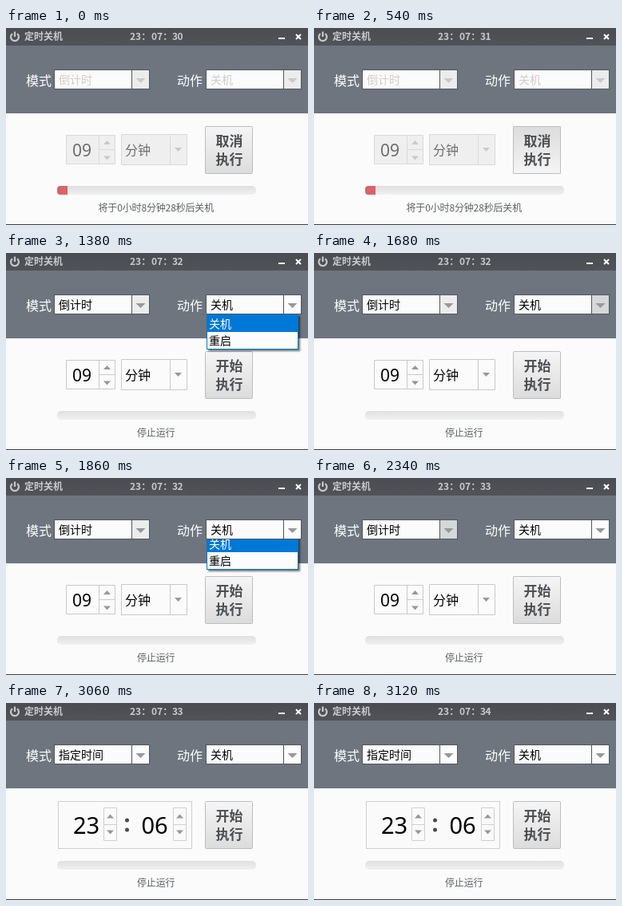
An HTML page for the animation above (3900 ms loop, 378 by 247 pixels).

```html
<!DOCTYPE html>
<html lang="zh-CN">
<head>
<meta charset="utf-8">
<title>定时关机</title>
<style>
html, body { margin: 0; width: 100%; height: 100%; overflow: hidden; background: #fbfbfb; }
#stage { display: block; width: 378px; height: 247px; font-family: "Noto Sans CJK SC", "Noto Sans CJK", sans-serif; }
#stage * { animation: 3.9s step-end infinite; }

.label { font-size: 16px; fill: #fff; }
.item { font-size: 14px; }
.note { font-size: 12px; fill: #5c5f68; letter-spacing: -.15px; }
.num { font-family: "Noto Sans", "Open Sans", sans-serif; font-size: 21px; }
.big { font-size: 29px; }
.bar { font-size: 12px; font-weight: 700; fill: #c9cacd; }
.go { font-size: 17px; font-weight: 700; fill: #4c4e51; text-anchor: middle; }
.field { fill: #fbfbfb; stroke: #51565d; }
.drop { stroke: #51565d; }
.spin { fill: #fafafa; stroke: #cfcfcf; }
.arrow { fill: #94999e; }
.list { fill: #fcfcfc; stroke: #0078d7; filter: drop-shadow(2.5px 2.5px 1px rgba(0, 0, 0, .55)); }
.pick { fill: #0078d7; }

/* disabled until the countdown is cancelled */
#stage .ink { animation-name: ink; }
#stage .dim { animation-name: dim; }
#stage .tri { animation-name: tri; }
#stage .box { animation-name: box; }
@keyframes ink { 0% { fill: #d3ccc9 } 15.384% { fill: #000 } }
@keyframes dim { 0% { fill: #6c6c6c } 15.384% { fill: #000 } }
@keyframes tri { 0% { fill: #c8cacc } 15.384% { fill: #94999e } }
@keyframes box { 0% { fill: #efefef; stroke: #d9d9d9 } 15.384% { fill: #fbfbfb; stroke: #c9c9c9 } }

#stage .running { animation-name: running; }
#stage .stopped { animation-name: stopped; }
@keyframes running { 0% { visibility: visible } 15.384% { visibility: hidden } }
@keyframes stopped { 0% { visibility: hidden } 15.384% { visibility: visible } }

#stage .countdown { animation-name: countdown; }
#stage .fixed { animation-name: fixed; }
@keyframes countdown { 0% { visibility: visible } 78.461% { visibility: hidden } }
@keyframes fixed { 0% { visibility: hidden } 78.461% { visibility: visible } }

#stage .hover { animation-name: hover; }
#stage .press { animation-name: press; }
@keyframes hover { 0% { visibility: hidden } 6.153% { visibility: visible } 18.461% { visibility: hidden } }
@keyframes press { 0% { visibility: hidden } 13.846% { visibility: visible } 15.384% { visibility: hidden } }

#stage .seconds { animation-name: seconds; }
@keyframes seconds {
  0% { transform: translateY(0) }
  6.153% { transform: translateY(-20px) }
  26.153% { transform: translateY(-40px) }
  53.846% { transform: translateY(-60px) }
  80% { transform: translateY(-80px) }
}

/* lists slide out from under their boxes and close at once */
#stage .act-list { animation-name: act-list; }
#stage .mode-list { animation-name: mode-list; }
@keyframes act-list {
  0%, 43.076%, 60% { transform: translateY(-60px) }
  30.769%, 44.615% { transform: translateY(-33px) }
  32.307%, 46.153% { transform: translateY(-20px) }
  33.846%, 47.692% { transform: translateY(-6px) }
  35.384%, 49.23% { transform: translateY(0) }
}
@keyframes mode-list {
  0%, 78.461% { transform: translateY(-60px) }
  63.076% { transform: translateY(-33px) }
  64.615% { transform: translateY(-20px) }
  66.153% { transform: translateY(-6px) }
  67.692% { transform: translateY(0) }
}
#stage .mode-pick { animation-name: mode-pick; }
#stage .first { animation-name: first; }
#stage .second { animation-name: second; }
@keyframes mode-pick { 0% { transform: translateY(21px) } 69.23% { transform: translateY(0) } }
@keyframes first { 0% { fill: #000 } 69.23% { fill: #fff } }
@keyframes second { 0% { fill: #fff } 69.23% { fill: #000 } }

#stage .act-drop { animation-name: act-drop; }
#stage .mode-drop { animation-name: mode-drop; }
@keyframes act-drop {
  0% { fill: #ececec }
  27.692%, 43.076% { fill: #d6d7d8 }
  30.769%, 44.615% { fill: #fcfcfc }
}
@keyframes mode-drop {
  0% { fill: #ececec }
  60% { fill: #d6d7d8 }
  63.076% { fill: #fcfcfc }
}
</style>
</head>
<body>
<svg id="stage" viewBox="0 0 378 247">
  <defs>
    <linearGradient id="top" x2="0" y2="1"><stop stop-color="#4a4c51"/><stop offset="1" stop-color="#515359"/></linearGradient>
    <linearGradient id="idle" x2="0" y2="1"><stop stop-color="#f5f5f5"/><stop offset="1" stop-color="#dcdcdc"/></linearGradient>
    <linearGradient id="lit" x2="0" y2="1"><stop stop-color="#fafafa"/><stop offset="1" stop-color="#e6e6e6"/></linearGradient>
    <linearGradient id="down" x2="0" y2="1"><stop stop-color="#dcdcdc"/><stop offset="1" stop-color="#f5f5f5"/></linearGradient>
    <linearGradient id="track" x2="0" y2="1"><stop stop-color="#e0e0e0"/><stop offset="1" stop-color="#f0f0f0"/></linearGradient>
    <path id="tri" d="M-6-3H6L0 3z"/>
    <path id="small" d="M-4.5-2.5H4.5L0 2.5z"/>
    <g id="steps">
      <path class="spin" d="M.5.5h16v41H.5zM.5 21.5h16"/>
      <use href="#small" class="arrow" transform="translate(8.5 11) scale(1 -1)"/>
      <use href="#small" class="arrow" x="8.5" y="31"/>
    </g>
  </defs>

  <rect width="378" height="247" fill="#fbfbfb"/>
  <rect width="378" height="22" fill="url(#top)"/>
  <rect y="22" width="378" height="85" fill="#6e757f"/>
  <rect y="246" width="378" height="1" fill="#3c3e43"/>

  <!-- title bar -->
  <path d="M8 7.2A5 5 0 1 0 14 7.2M11 4.5V11" fill="none" stroke="#c6c8ca" stroke-width="2.2"/>
  <text class="bar" x="23" y="15">定时关机</text>
  <text class="bar" y="15"><tspan x="155">23：</tspan><tspan x="182">07：</tspan><tspan x="208">3</tspan></text>
  <svg x="214" y="3" width="10" height="16">
    <g class="seconds bar">
      <text x=".5" y="12">0</text><text x=".5" y="32">1</text><text x=".5" y="52">2</text>
      <text x=".5" y="72">3</text><text x=".5" y="92">4</text>
    </g>
  </svg>
  <path d="M341 13H349M363 8L369 14M369 8L363 14" stroke="#fff" stroke-width="2"/>

  <!-- mode and action -->
  <text class="label" x="25" y="71.5">模式</text>
  <text class="label" x="214" y="71.5">动作</text>
  <rect class="field" x="60.5" y="52.5" width="119" height="24"/>
  <rect class="drop mode-drop" x="157.5" y="52.5" width="22" height="24"/>
  <use href="#tri" class="tri" x="168.5" y="66"/>
  <g class="countdown"><text class="item ink" x="66" y="70">倒计时</text></g>
  <g class="fixed"><text class="item" x="66" y="70">指定时间</text></g>
  <rect class="field" x="250.5" y="52.5" width="119" height="24"/>
  <rect class="drop act-drop" x="347.5" y="52.5" width="22" height="24"/>
  <use href="#tri" class="tri" x="358.5" y="66"/>
  <text class="item ink" x="256" y="70">关机</text>

  <!-- countdown length -->
  <g class="countdown">
    <path class="box" d="M75.5 134.5h61v36h-61zM116.5 134.5v36M116.5 152.5h20"/>
    <text class="num dim" x="83" y="160.5">09</text>
    <use href="#small" class="tri" transform="translate(126.5 143.5) scale(1 -1)"/>
    <use href="#small" class="tri" x="126.5" y="163"/>
    <path class="box" d="M144.5 133.5h82v38h-82zM205.5 133.5v38"/>
    <text class="dim" font-size="16" x="149" y="159">分钟</text>
    <use href="#small" class="tri" x="215.5" y="152.5"/>
  </g>

  <!-- fixed time -->
  <g class="fixed">
    <rect class="spin" x="65.5" y="123.5" width="167" height="59"/>
    <text class="num big" x="84" y="164">23</text>
    <text class="num big" x="169.5" y="164">06</text>
    <use href="#steps" x="122" y="131"/>
    <use href="#steps" x="209" y="131"/>
    <g fill="#4a4a4a"><circle cx="151.5" cy="147" r="2.5"/><circle cx="151.5" cy="159" r="2.5"/></g>
  </g>

  <!-- start / cancel -->
  <g stroke="#bdbdbd">
    <rect x="249.5" y="123.5" width="59" height="59" rx="1" fill="url(#idle)"/>
    <rect class="hover" x="249.5" y="123.5" width="59" height="59" rx="1" fill="url(#lit)"/>
    <rect class="press" x="249.5" y="123.5" width="59" height="59" rx="1" fill="url(#down)"/>
  </g>
  <text class="go running" x="279.5" y="148">取消</text>
  <text class="go stopped" x="279.5" y="148">开始</text>
  <text class="go" x="279.5" y="171">执行</text>

  <!-- progress -->
  <rect x="64" y="198" width="249" height="11" rx="5" fill="url(#track)"/>
  <path class="running" d="M68 198H77V209H68A4 4 0 0 1 64 205V202A4 4 0 0 1 68 198z" fill="#d9646a"/>
  <text class="note running" x="115.5" y="230">将于0小时8分钟28秒后关机</text>
  <text class="note stopped" x="164" y="230">停止运行</text>

  <!-- open lists -->
  <svg x="61" y="77" width="120" height="48">
    <g class="mode-list">
      <rect class="list" x=".5" y=".5" width="114" height="43"/>
      <rect class="pick mode-pick" x="1" y="1" width="113" height="21"/>
      <text class="item first" x="3" y="17">指定时间</text>
      <text class="item second" x="3" y="38">倒计时</text>
    </g>
  </svg>
  <svg x="251" y="77" width="120" height="48">
    <g class="act-list">
      <rect class="list" x=".5" y=".5" width="114" height="43"/>
      <rect class="pick" x="1" y="1" width="113" height="21"/>
      <text class="item" x="3" y="17" fill="#fff">关机</text>
      <text class="item" x="3" y="38">重启</text>
    </g>
  </svg>
</svg>
</body>
</html>
```
